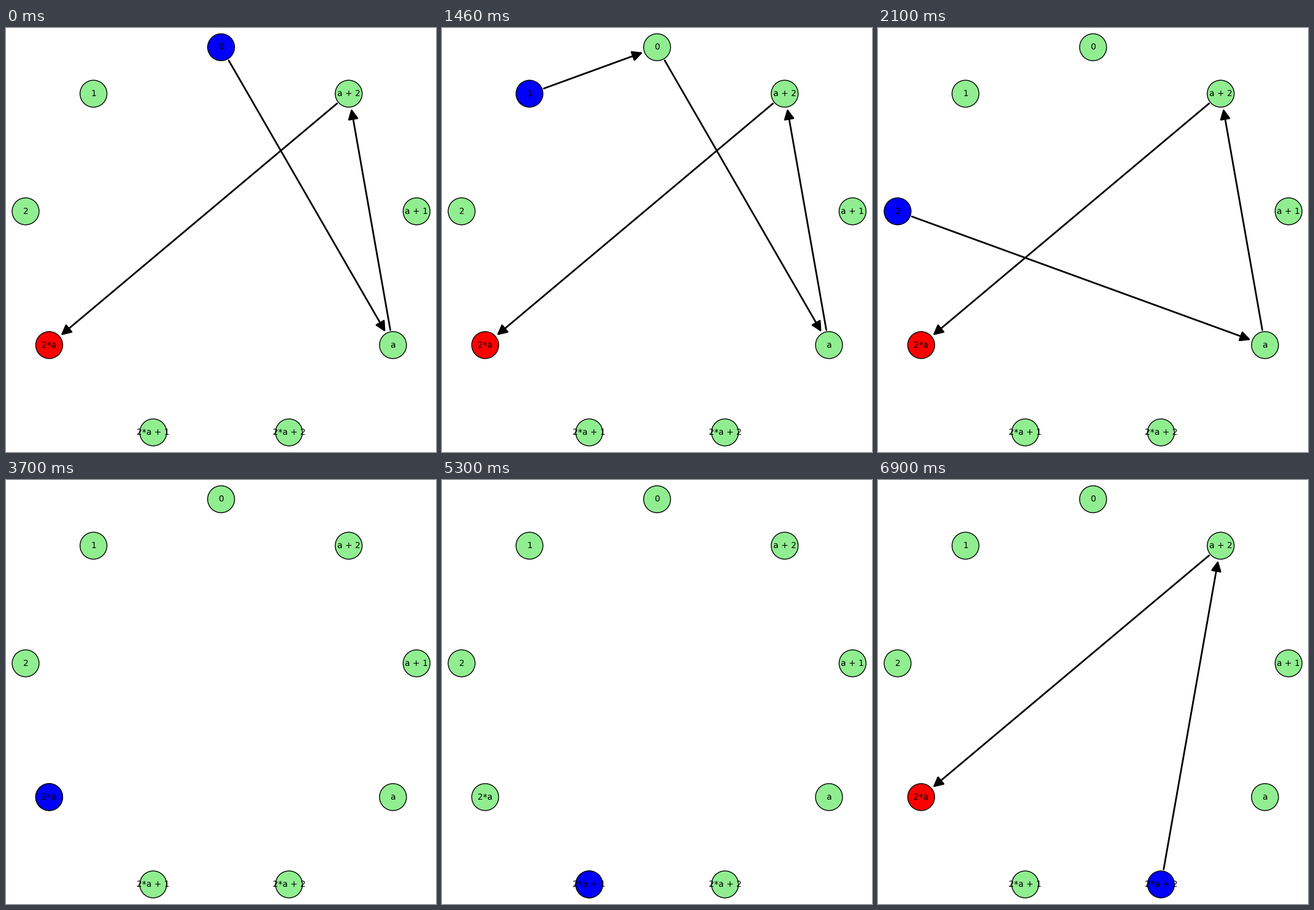
Recreate the animation shown at these times as a matplotlib script. Size 701 by 691 pixels, loop 8000 ms.

```python
import numpy as np
import matplotlib.pyplot as plt
from matplotlib.animation import FuncAnimation
from matplotlib.patches import Circle, FancyArrowPatch

W, H, DPI = 701, 691, 100
STEP, LOOP = 100, 8000          # ms
FIRST, HOLD = 500, 1600         # ms: first pose, then each following pose

# Elements of the field, counter-clockwise from the top, and the map on them
LABELS = ["0", "1", "2", "2*a", "2*a + 1", "2*a + 2", "a", "a + 1", "a + 2"]
NEXT = {"0": "a", "1": "0", "2": "a", "a": "a + 2", "a + 2": "2*a",
        "2*a": "2*a", "2*a + 1": "2*a + 1", "2*a + 2": "a + 2"}
STARTS = ["0", "1", "2", "2*a", "2*a + 1", "2*a + 2"]

NODE_AREA = 1000                                # square points
NODE_R = np.sqrt(NODE_AREA) / 2 * DPI / 72      # pixels
GAP = np.sqrt(NODE_AREA / np.pi)                # points
RING, PAD = 323.6, 10

plt.rcParams["font.family"] = "DejaVu Sans"
fig = plt.figure(figsize=(W / DPI, H / DPI), dpi=DPI, facecolor="white")
ax = fig.add_axes([0, 0, 1, 1])
ax.set_xlim(0, W)
ax.set_ylim(0, H)
ax.axis("off")

# The ring of nodes sits PAD pixels from the left and bottom edges
angles = np.radians(90 + 40 * np.arange(len(LABELS)))
spots = RING * np.column_stack([np.cos(angles), np.sin(angles)])
spots += PAD + NODE_R - spots.min(axis=0)
pos = dict(zip(LABELS, spots))


def add_node(xy, color, z):
    return ax.add_patch(Circle(xy, NODE_R, fc=color, ec="black", lw=1, zorder=z))


nodes = {}
for name, (x, y) in pos.items():
    nodes[name] = add_node((x, y), "lightgreen", 3)
    ax.text(x, y, name, size=10, color="black", ha="center", va="center", zorder=6)
last = add_node(pos["2*a"], "red", 4)
first = add_node(pos["0"], "blue", 5)

arrows = {}
for tail, head in NEXT.items():
    if tail != head:
        arrows[tail] = ax.add_patch(FancyArrowPatch(
            pos[tail], pos[head], color="black", lw=2, zorder=2,
            arrowstyle="-|>,head_width=5,head_length=10", mutation_scale=1,
            shrinkA=GAP, shrinkB=GAP))


def orbit(start):
    path = [start]
    while NEXT[path[-1]] != path[-1]:
        path.append(NEXT[path[-1]])
    return path


def update(i):
    t = i * STEP
    pose = 0 if t < FIRST else 1 + (t - FIRST) // HOLD
    path = orbit(STARTS[pose])
    first.center, last.center = pos[path[0]], pos[path[-1]]
    for name, node in nodes.items():
        node.set_visible(name not in (path[0], path[-1]))
    for tail, arrow in arrows.items():
        arrow.set_visible(tail in path)
    return [first, last, *nodes.values(), *arrows.values()]


anim = FuncAnimation(fig, update, frames=LOOP // STEP, interval=STEP,
                     repeat=True, repeat_delay=0, blit=False)
plt.show()
```
